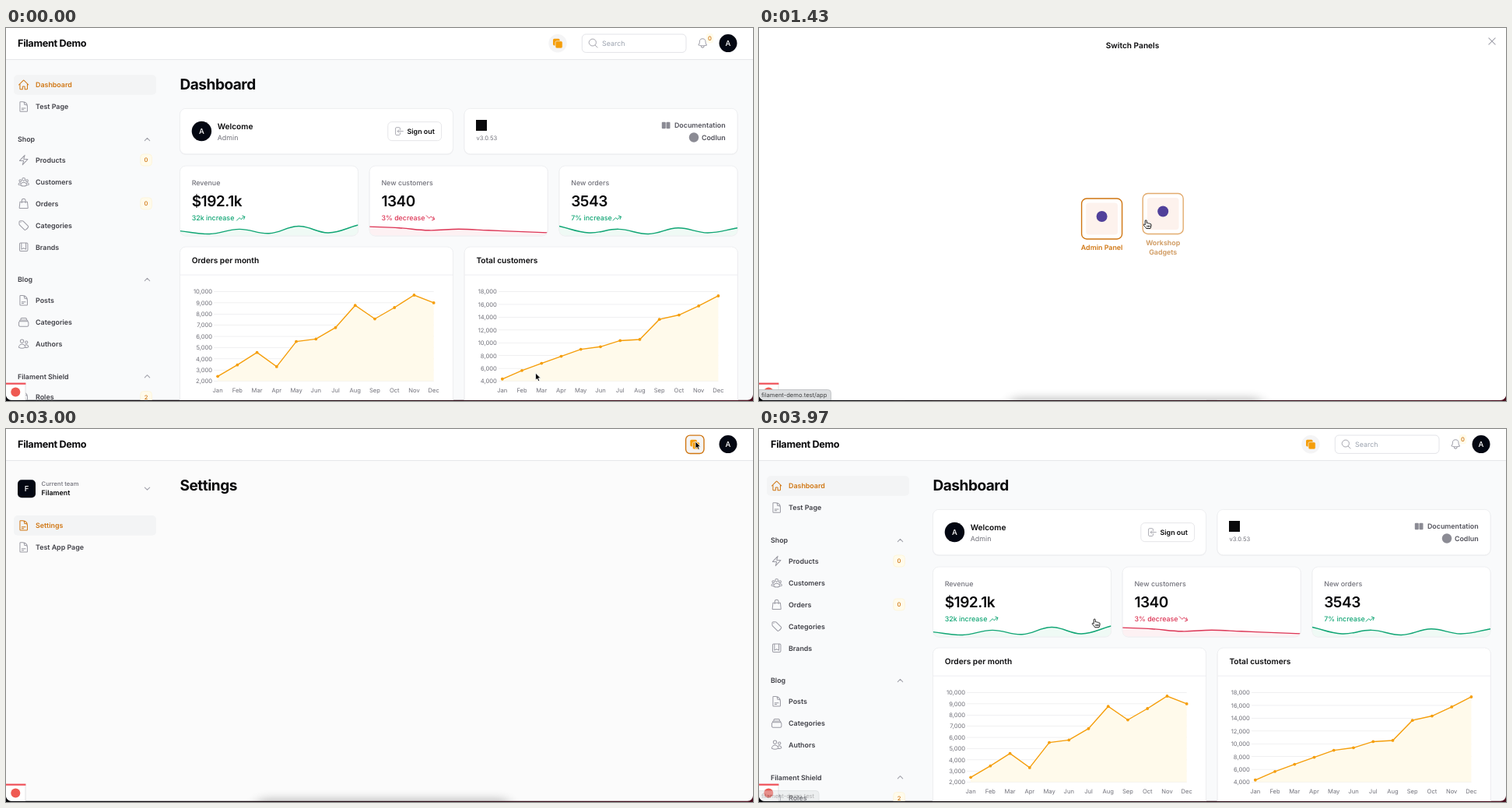
An HTML page for the animation above (4000 ms loop, 960x479 px).

```html
<!DOCTYPE html>
<html lang="en">
<head>
<meta charset="utf-8">
<title>Switch Panels</title>
<style>
  html, body { margin: 0; width: 100%; height: 100%; overflow: hidden; background: #111; }
  svg { display: block; width: 100vw; height: 100vh; }
  text { font-family: Inter, "Open Sans", sans-serif; font-optical-sizing: none; text-rendering: geometricPrecision; }
  .icon path { fill: none; stroke-linecap: round; stroke-linejoin: round; }
</style>
</head>
<body>
<svg id="stage" viewBox="0 0 960 479" preserveAspectRatio="none" xmlns="http://www.w3.org/2000/svg"></svg>
<script>
const LOOP = 4000;
const XS = 7.62, SM = 8.89, MD = 10.16, LG = 12.7, XL = 19.05;
const INK = '#09090b', LABEL = '#3f3f46', MUTED = '#71717a', FAINT = '#a1a1aa';
const ORANGE = '#d07612', AMBER = '#f59e0b', GREEN = '#10a574', RED = '#dc3555';

const ICONS = {
  home: 'm2.25 12 8.95-8.95c.44-.44 1.15-.44 1.6 0L21.75 12M4.5 9.75v10.1c0 .6.5 1.15 1.1 1.15h4.15v-4.9c0-.6.5-1.1 1.1-1.1h2.3c.6 0 1.1.5 1.1 1.1V21h4.15c.6 0 1.1-.5 1.1-1.1V9.75',
  page: 'M19.5 11.3a3.4 3.4 0 0 0-3.4-3.2h-1.5A1.1 1.1 0 0 1 13.5 7V5.6a3.4 3.4 0 0 0-3-3.4H5.6c-.6 0-1.1.5-1.1 1.1v17.3c0 .6.5 1.1 1.1 1.1h12.8c.6 0 1.1-.5 1.1-1.1v-9.3a9 9 0 0 0-9-9.1M8.2 15h7.5M8.2 18H12',
  bolt: 'm3.75 13.5 10.5-11.25L12 10.5h8.25L9.75 21.75 12 13.5z',
  group: 'M15 7a3 3 0 1 1-6 0 3 3 0 0 1 6 0M6 19a6 6 0 0 1 12 0 12 12 0 0 1-12 0M21 9.8a2.2 2.2 0 1 1-4.4 0 2.2 2.2 0 0 1 4.4 0M7.4 9.8a2.2 2.2 0 1 1-4.4 0 2.2 2.2 0 0 1 4.4 0M18 18.7c4 0 5-1 4.5-2a3 3 0 0 0-5-1.5M6 18.7c-4 0-5-1-4.5-2a3 3 0 0 1 5-1.5',
  bag: 'M15.75 10.5V6a3.75 3.75 0 1 0-7.5 0v4.5M4.6 8.5h14.8l1.3 12a1.1 1.1 0 0 1-1.1 1.2H4.4a1.1 1.1 0 0 1-1.1-1.2z',
  tag: 'M9.6 3H5.25A2.25 2.25 0 0 0 3 5.25v4.3c0 .6.25 1.2.66 1.6l9.6 9.6c.7.7 1.8.87 2.6.33a18 18 0 0 0 5.2-5.2c.54-.8.37-1.9-.33-2.6L11.2 3.66A2.25 2.25 0 0 0 9.6 3M6 6h.2',
  bookmark: 'M16.5 3.75V16.5L12 14.25 7.5 16.5V3.75M6 3.75h12A2.25 2.25 0 0 1 20.25 6v12A2.25 2.25 0 0 1 18 20.25H6A2.25 2.25 0 0 1 3.75 18V6A2.25 2.25 0 0 1 6 3.75',
  stack: 'M6 6.5a2.5 2.5 0 0 1 2.3-2.8h7.4A2.5 2.5 0 0 1 18 6.5M4 10.5a2.2 2.2 0 0 1 2-3h12a2.2 2.2 0 0 1 2 3M4.5 10.5h15a2.2 2.2 0 0 1 2.2 2.2v5.5a2.2 2.2 0 0 1-2.2 2.2h-15a2.2 2.2 0 0 1-2.2-2.2v-5.5a2.2 2.2 0 0 1 2.2-2.2',
  users: 'M12 6.4a3.4 3.4 0 1 1-6.8 0 3.4 3.4 0 0 1 6.8 0M2.2 19a6.4 6.4 0 0 1 12.8 0 12.5 12.5 0 0 1-12.8 0M20.2 8.6a2.6 2.6 0 1 1-5.2 0 2.6 2.6 0 0 1 5.2 0M15 19.1a9 9 0 0 0 6.7-1 4.1 4.1 0 0 0-7.5-2.5',
  bell: 'M14.9 17.1a24 24 0 0 0 5.4-1.3A9 9 0 0 1 18 9.75V9A6 6 0 0 0 6 9v.75a9 9 0 0 1-2.3 6 24 24 0 0 0 5.4 1.35m5.8 0a24 24 0 0 1-5.8 0m5.8 0a3 3 0 1 1-5.8 0',
  search: 'm21 21-5.2-5.2A7.5 7.5 0 1 0 5.2 5.2a7.5 7.5 0 0 0 10.6 10.6',
  exit: 'M14 9V5.5a2.2 2.2 0 0 0-2.2-2.2h-6a2.2 2.2 0 0 0-2.2 2.2v13a2.2 2.2 0 0 0 2.2 2.2h6a2.2 2.2 0 0 0 2.2-2.2V15M11 9l-3 3 3 3M8 12h13',
  up: 'M2.25 18 9 11.25l4.3 4.3a12 12 0 0 1 5.8-5.5l2.75-1.2-5.95-2.3m5.95 2.3-2.3 5.95',
  down: 'M2.25 6 9 12.75l4.3-4.3a12 12 0 0 1 5.8 5.5l2.75 1.2-5.95 2.3m5.95-2.3-2.3-5.95',
  chevronUp: 'M7 14.5l5-5 5 5',
  chevronDown: 'M7 9.5l5 5 5-5',
  close: 'M5.5 5.5l13 13M18.5 5.5l-13 13'
};

const text = (x, y, str, size, weight, fill, anchor = 'start', spacing = 0) =>
  `<text x="${x}" y="${y}" font-size="${size}" font-weight="${weight}" fill="${fill}" text-anchor="${anchor}" letter-spacing="${spacing}">${str}</text>`;
const tight = (x, y, str, size, weight) => text(x, y, str, size, weight, INK, 'start', -size * .025);
const rect = (x, y, w, h, r, fill, stroke = 'none', width = 1) =>
  `<rect x="${x}" y="${y}" width="${w}" height="${h}" rx="${r}" fill="${fill}" stroke="${stroke}" stroke-width="${width}"/>`;
const circle = (x, y, r, fill) => `<circle cx="${x}" cy="${y}" r="${r}" fill="${fill}"/>`;
const icon = (name, x, y, color = FAINT, scale = .635, width = 1.6) =>
  `<g class="icon" transform="translate(${x - 12 * scale} ${y - 12 * scale}) scale(${scale})"><path d="${ICONS[name]}" stroke="${color}" stroke-width="${width}"/></g>`;
const group = (id, body) => `<g id="${id}">${body}</g>`;
const card = (x, y, w, h) =>
  rect(x, y + .6, w, h, 7.5, 'none', '#f0f0f2', 1.2) + rect(x, y, w, h, 7.5, '#fff', '#ebecef', .8);
const avatar = (x, y, r) => circle(x, y, r, '#030712') + text(x, y + 3.5, 'A', 9.6, 500, '#fff', 'middle');

const header = () => rect(0, 0, 960, 40, 0, '#fff') + rect(0, 40, 960, 1, 0, '#e6e7ea') +
  tight(15, 24.2, 'Filament Demo', LG, 700) + avatar(928, 19.6, 11.5);

function switchButton(id, x, round) {
  const r = round ? 11.7 : 5.5;
  const box = (fill, stroke) => rect(x - 11.7, 8.1, 23.4, 23.4, r, fill, stroke, 1.4);
  return box('#f4f4f5') + group(id, box('none', ORANGE)) +
    rect(x - 6, 13.8, 8.6, 8.6, 1.6, AMBER) + rect(x - 3, 16.8, 9.2, 9.2, 1.9, AMBER, '#f4f4f5', .7);
}

function navItem(y, label, iconName, { active, badge } = {}) {
  const color = active ? ORANGE : LABEL;
  return (active ? rect(10, y - 12.8, 183, 25.6, 5, '#f3f4f5') : '') +
    icon(iconName, 22.7, y, active ? ORANGE : '#9b9ba4') +
    text(38, y + 3.2, label, SM, 600, color) +
    (badge ? rect(172.8, y - 7.5, 14.6, 15, 4, '#fffbeb', '#fdf3d3', .7) + text(180, y + 2.8, badge, XS, 500, ORANGE, 'middle') : '');
}
const navGroup = (y, label) => text(15, y + 3.2, label, SM, 600, LABEL) + icon('chevronUp', 181.5, y, FAINT, .635, 1.7);

// Cubic spline through the points, with handles weighted by neighbour distance.
function spline(points, tension = .4) {
  const handles = points.map((p, i) => {
    const a = points[i - 1] || p, b = points[i + 1] || p;
    const da = Math.hypot(p[0] - a[0], p[1] - a[1]), db = Math.hypot(b[0] - p[0], b[1] - p[1]);
    const ka = tension * da / (da + db), kb = tension * db / (da + db);
    const dx = b[0] - a[0], dy = b[1] - a[1];
    return [p[0] - ka * dx, p[1] - ka * dy, p[0] + kb * dx, p[1] + kb * dy];
  });
  return 'M' + points[0] + points.slice(1).map((p, i) =>
    `C${handles[i].slice(2)} ${handles[i + 1].slice(0, 2)} ${p}`).join('');
}

function stat(x, label, value, note, noteWidth, color, tint, values, toY) {
  const line = spline(values.map((v, i) => [x + i * 229 / 6, toY(v)]));
  const trend = color === RED ? 'down' : 'up';
  const clip = 'clip' + x;
  return card(x, 177, 229, 89.5) +
    text(x + 15.2, 202, label, SM, 500, MUTED) + tight(x + 15.2, 228.8, value, XL, 600) +
    text(x + 15.2, 247.4, note, SM, 500, color) + icon(trend, x + 15.2 + noteWidth + 8, 244, color, .53, 1.8) +
    `<clipPath id="${clip}">${rect(x, 177, 229, 89.5, 7.5, '#000')}</clipPath><g clip-path="url(#${clip})">
     <path d="${line}V267H${x}z" fill="${tint}"/><path d="${line}" fill="none" stroke="${color}" stroke-width="1.4"/></g>`;
}

const MONTHS = 'Jan Feb Mar Apr May Jun Jul Aug Sep Oct Nov Dec'.split(' ');
function chart(x, title, low, high, step, values) {
  const left = x + 48.6, dx = 277.6 / 11, top = 338.5, bottom = 453.6;
  const toY = v => bottom - (v - low) / (high - low) * (bottom - top);
  let out = card(x, 281, 351, 210) + text(x + 15.2, 302.4, title, MD, 600, INK) + rect(x, 316.6, 351, .9, 0, '#ececef');
  for (let v = low; v <= high; v += step)
    out += rect(left - 5, toY(v) - .3, 282.6, .6, 0, '#e6e6e8') +
      text(left - 7, toY(v) + 2.8, v.toLocaleString('en-US'), XS, 400, MUTED, 'end');
  const points = values.map((v, i) => [left + i * dx, toY(v)]);
  const line = 'M' + points.join('L');
  return out + `<path d="${line}V${bottom}H${left}z" fill="#fffaeb"/><path d="${line}" fill="none" stroke="${AMBER}" stroke-width="1.4"/>` +
    points.map(([px, py]) => circle(px, py, 1.9, AMBER)).join('') +
    MONTHS.map((m, i) => text(left + i * dx, 468, m, XS, 400, MUTED, 'middle')).join('');
}

function dashboard() {
  const green = v => 266 - .767 * v;
  return rect(0, 0, 960, 479, 0, '#f9fafb') + header() + switchButton('ringA', 709, true) +
    rect(740.3, 8, 133.7, 23.4, 5, '#fff', '#e3e4e8', 1) + icon('search', 754.7, 19.6, FAINT, .6) +
    text(766, 23, 'Search', SM, 400, '#9ca3af') + icon('bell', 895.2, 19.5) +
    rect(899.8, 7, 9.4, 12.4, 3.5, '#fffbeb') + text(904.4, 16, '0', XS, 500, ORANGE, 'middle') +
    navItem(73, 'Dashboard', 'home', { active: true }) + navItem(101, 'Test Page', 'page') +
    navGroup(143, 'Shop') + navItem(169.5, 'Products', 'bolt', { badge: '0' }) +
    navItem(197.5, 'Customers', 'group') + navItem(225.4, 'Orders', 'bag', { badge: '0' }) +
    navItem(253.4, 'Categories', 'tag') + navItem(281.3, 'Brands', 'bookmark') +
    navGroup(323, 'Blog') + navItem(349.8, 'Posts', 'page') + navItem(377.8, 'Categories', 'stack') +
    navItem(405.7, 'Authors', 'users') + navGroup(447.3, 'Filament Shield') +
    navItem(474, 'Roles', 'page', { badge: '2' }) +
    tight(223.5, 78.9, 'Dashboard', XL, 700) +
    card(223.5, 103.4, 351, 58.4) + avatar(251.4, 132.5, 12.7) +
    text(271.7, 129.8, 'Welcome', MD, 600, INK) + text(271.7, 143.5, 'Admin', SM, 400, MUTED) +
    rect(490.8, 120.6, 68.8, 24, 5, '#fff', '#e4e4e7', .9) + icon('exit', 505.3, 132.6, FAINT, .56) +
    text(515.5, 135.9, 'Sign out', SM, 600, INK) +
    card(589, 103.4, 351, 58.4) + rect(604, 118, 14, 14, 0, INK) + text(604.4, 144.2, 'v3.0.53', XS, 400, MUTED) +
    rect(842.8, 120.7, 5, 8.6, 1, '#8b8b94') + rect(848.5, 120.7, 5, 8.6, 1, '#8b8b94') +
    text(924.6, 128.3, 'Documentation', SM, 600, '#52525b', 'end') +
    circle(884, 140.5, 6.2, '#8b8b94') + text(924.6, 143.7, 'Codlun', SM, 600, '#52525b', 'end') +
    stat(223.5, 'Revenue', '$192.1k', '32k increase', 55, GREEN, '#effaf5', [7, 2, 10, 3, 15, 4, 17], green) +
    stat(467.2, 'New customers', '1340', '3% decrease', 55, RED, '#fdf1f3', [17, 16, 14, 15, 14, 13, 12], v => 281.5 - 1.55 * v) +
    stat(711, 'New orders', '3543', '7% increase', 51, GREEN, '#effaf5', [15, 4, 10, 2, 12, 4, 12], green) +
    chart(223.5, 'Orders per month', 2000, 10000, 1000, [2433, 3454, 4566, 3300, 5545, 5765, 6787, 8767, 7565, 8576, 9686, 8996]) +
    chart(589.2, 'Total customers', 4000, 18000, 2000, [4344, 5676, 6798, 7890, 8987, 9388, 10343, 10524, 13664, 14345, 15753, 17332]);
}

const dockShadow = `<g filter="url(#soft)">${rect(322, 475, 325, 24, 10, '#000')}</g>`;

const settings = () => rect(0, 0, 960, 479, 0, '#fbfbfb') + dockShadow + header() + switchButton('ringB', 885.3, false) +
  rect(15, 65.2, 23, 23, 5, '#030712') + text(26.5, 80.3, 'F', 9.6, 500, '#fff', 'middle') +
  text(45.6, 73.2, 'Current team', XS, 500, MUTED) + text(45.6, 85.2, 'Filament', SM, 600, INK) +
  icon('chevronDown', 181.5, 76.6, FAINT, .635, 1.7) +
  navItem(123.9, 'Settings', 'page', { active: true }) + navItem(151.9, 'Test App Page', 'page') +
  tight(223.5, 78.9, 'Settings', XL, 700);

const tileRing = (id, x, y, color) => group(id, rect(x - 26, y - 26, 52, 52, 6.5, 'none', color, 1.4));

function panel(id, x, y, lines) {
  const label = color => lines.map((l, i) => text(x, y + 40.2 + i * 12.7, l, SM, 600, color, 'middle')).join('');
  return rect(x - 20.4, y - 20.4, 40.8, 40.8, 4, '#fdf2ed') + circle(x, y - 3, 7, '#50409a') +
    group(id + 'Idle', label(FAINT)) + group(id + 'Label', label(ORANGE)) + tileRing(id + 'Ring', x, y, ORANGE);
}

const modal = (id, adminX, otherX) => rect(0, 0, 960, 479, 0, '#fff') + dockShadow +
  text(480, 25.5, 'Switch Panels', MD, 600, INK, 'middle') + icon('close', 942, 17, FAINT, .635, 1.6) +
  panel(id + 'Admin', adminX, 245, ['Admin Panel']) + panel(id + 'Other', otherX, 238.5, ['Workshop', 'Gadgets']);

const URLS = [['filament-demo.test', 77], ['filament-demo.test/app', 92.5], ['filament-demo.test/app/1/settings', 129]];
const status = ([url, w], i) => group('status' + i,
  `<path d="M0 464.5H${w - 4}q4 0 4 4V478H0z" fill="#dcdee0" stroke="#b9bbbe" stroke-width=".8"/>` + text(3, 474.2, url, XS, 400, '#3f4042'));

const debugBadge = rect(-1, 457, 26, 23, 0, '#fff', '#dcdcdf', .8) + rect(0, 455.6, 25.4, 2.2, 0, '#f0525a') + circle(12.3, 467.5, 6, '#ef5a52');

document.getElementById('stage').innerHTML = `
  <defs>
    <filter id="soft" x="-20%" y="-150%" width="140%" height="400%"><feGaussianBlur stdDeviation="8 6"/><feComponentTransfer><feFuncA type="linear" slope=".24"/></feComponentTransfer></filter>
    <linearGradient id="desk"><stop offset=".1" stop-color="#08080c"/><stop offset="1" stop-color="#4a0f1e"/></linearGradient>
    <clipPath id="window">${rect(0, -20, 960, 497.8, 7, '#000')}</clipPath>
  </defs>
  <rect width="960" height="479" fill="url(#desk)"/>
  <g clip-path="url(#window)">
    ${group('dashboard', dashboard())}${group('settings', settings())}
    ${group('modalA', modal('a', 440.6, 519.2))}
    ${group('modalB', modal('b', 443.2, 516.8) + tileRing('focusRing', 516.8, 238.5, '#a9c3f5'))}
    ${debugBadge}${URLS.map(status).join('')}
  </g>
  <g id="cursor">
    <path id="arrow" d="M0 0V9.2L2.1 7.3 3.6 10.6 5.2 9.9 3.8 6.7H6.7z" fill="#000" stroke="#fff" stroke-width=".8"/>
    <path id="hand" d="M-1.3 1.2Q-1.3 0-.3 0T.8 1.2V3.8Q2 3.2 2.8 4.2Q4 3.7 4.7 4.7Q6.6 4.4 6.6 6.2Q6.6 8.7 5.4 10.8H.3Q-1 8.6-3 6.8Q-3.8 5.6-2.8 5.3Q-2 5.2-1.3 6.2zM1.4 6.8V9M3.1 6.8V9M4.7 6.8V9" fill="#fff" stroke="#111" stroke-width=".95" stroke-linejoin="round"/>
  </g>`;

const el = {};
document.querySelectorAll('#stage [id]').forEach(node => el[node.id] = node);

const ramp = (t, from, to) => Math.min(1, Math.max(0, (t - from) / (to - from)));
const smooth = p => p * p * (3 - 2 * p);
const easeOut = p => 1 - (1 - p) ** 3;
const between = (t, from, to) => t >= from && t < to;
const show = (id, alpha) => {
  el[id].style.opacity = alpha;
  el[id].style.display = alpha > 0 ? '' : 'none';
};
const setPanel = (id, label, ring) => {
  show(id + 'Idle', 1 - label);
  show(id + 'Label', label);
  show(id + 'Ring', ring);
};

// Cursor stops: time, x, y.
const PATH = [
  [0, 680.5, 443], [400, 707, 13], [770, 707, 13], [970, 521, 247.5], [1100, 521, 247.5], [1230, 448, 241],
  [1300, 448, 241], [1480, 508.5, 248], [2110, 508.5, 248], [2420, 178.5, 123.8], [2500, 178.5, 123.8],
  [2930, 886, 16], [3180, 886, 16], [3350, 447.5, 228], [3850, 447.5, 228], [3970, 431.5, 244], [LOOP, 431.5, 244]
];
function cursorAt(t) {
  const i = PATH.findIndex(stop => stop[0] > t);
  const [t0, x0, y0] = PATH[i - 1], [t1, x1, y1] = PATH[i];
  const p = smooth(ramp(t, t0, t1));
  return [x0 + (x1 - x0) * p, y0 + (y1 - y0) * p];
}

function draw(t) {
  const onSettings = between(t, 2100, 3770);
  show('dashboard', onSettings ? 0 : 1);
  show('settings', onSettings ? 1 : 0);
  show('modalA', t < 2100 ? easeOut(ramp(t, 435, 635)) : 0);
  show('modalB', onSettings ? easeOut(ramp(t, 3150, 3400)) : 0);
  show('ringA', between(t, 370, 800) ? 1 : 0);
  show('ringB', between(t, 2900, 3220) ? 1 : 0);

  const otherHover = ramp(t, 930, 990) - ramp(t, 1120, 1230) + ramp(t, 1370, 1470);
  setPanel('aAdmin', 1, 1);
  setPanel('aOther', otherHover, otherHover);
  const adminHover = ramp(t, 3370, 3460);
  setPanel('bAdmin', adminHover, adminHover);
  setPanel('bOther', 1, adminHover);
  show('focusRing', 1 - adminHover);

  show('status0', between(t, 1200, 1380) ? ramp(t, 1190, 1260) : ramp(t, 3420, 3500) - .6 * ramp(t, 3890, 3970));
  show('status1', between(t, 1380, 2200) ? 1 - ramp(t, 2110, 2200) : 0);
  show('status2', .65 * (ramp(t, 2400, 2460) - ramp(t, 2500, 2600)));

  const [x, y] = cursorAt(t);
  const pointing = between(t, 910, 2120) || between(t, 2370, 2540) || t >= 3330;
  el.cursor.setAttribute('transform', `translate(${x} ${y})`);
  show('hand', pointing ? 1 : 0);
  show('arrow', pointing ? 0 : 1);
}

const start = performance.now();
function tick() {
  draw((performance.now() - start) % LOOP);
  requestAnimationFrame(tick);
}
tick();
</script>
</body>
</html>
```
